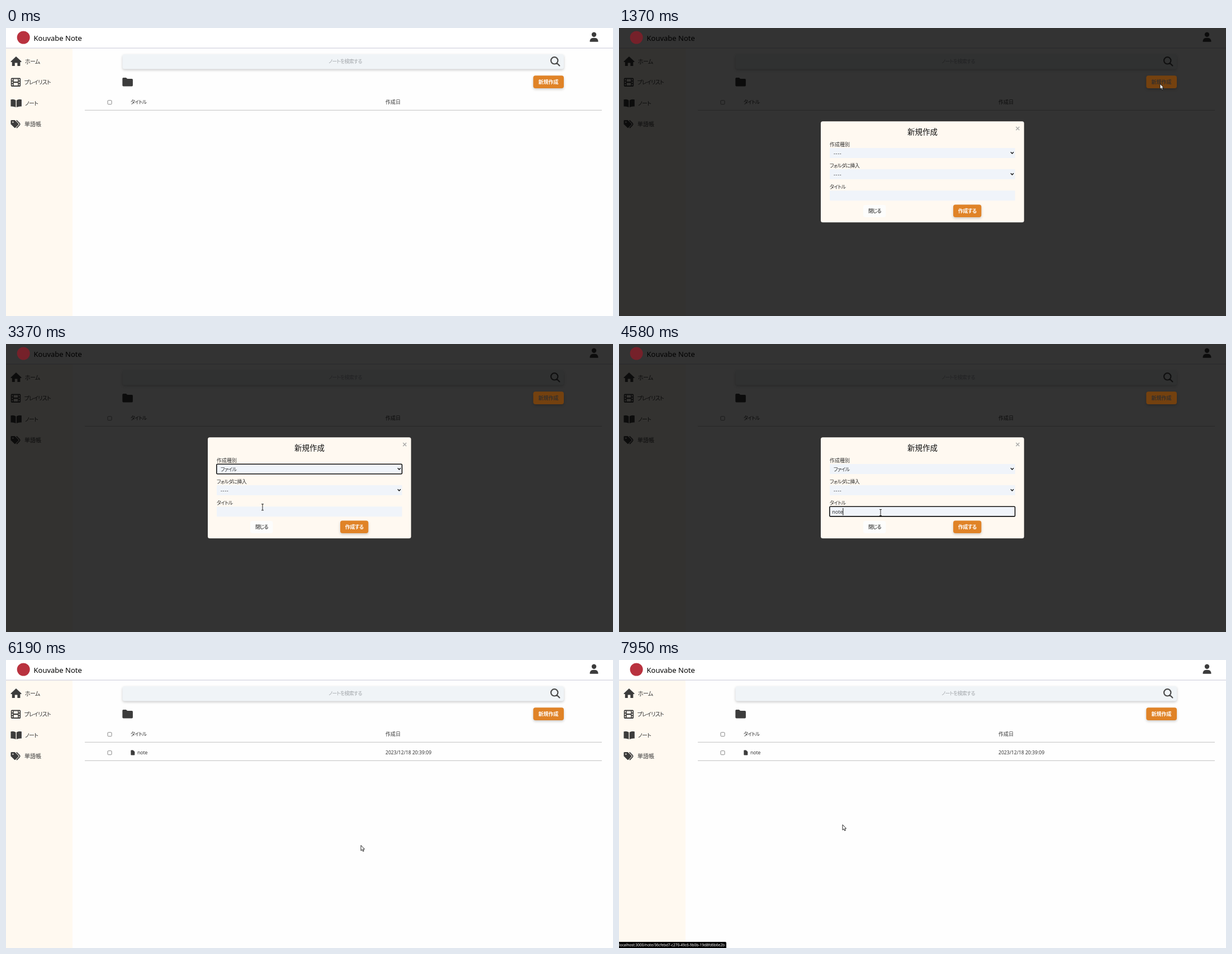
An HTML page for the animation above (8 s loop, 1086 by 516 pixels).

```html
<!DOCTYPE html>
<html lang="ja">
<head>
<meta charset="utf-8">
<title>Note</title>
<style>
  html, body { margin: 0; width: 100%; height: 100%; overflow: hidden; background: #fefefe; }
  svg { display: block; width: 100%; height: 100%; }
  text { font: 9px "Noto Sans", "Noto Sans CJK JP", "Noto Sans CJK", sans-serif; fill: #333; }
  .ja { font-family: "Noto Sans CJK JP", "Noto Sans CJK", sans-serif; }
  .kana { font-feature-settings: "palt"; letter-spacing: -.7px; }
  .menu { font-size: 10px; }
  .mid { text-anchor: middle; }
  .bold { font-weight: 700; fill: #fff; }
  .dash { letter-spacing: .7px; }
  .icon { fill: #3c3c3c; }
  .field { fill: #f0f4fa; }
  .line { stroke: #ccc; stroke-width: 1.2; }
  .box { fill: #fff; stroke: #767676; stroke-width: .9; }
  .ring { fill: none; stroke: #101010; stroke-width: 1.6; }
  .chevron { fill: none; stroke: #111; stroke-width: 1.4; }
  .pointer { fill: #fff; stroke: #111; stroke-width: .9; stroke-linejoin: round; }
  .soft { filter: drop-shadow(0 2px 2px #0003); }
</style>
</head>
<body>
<svg viewBox="0 0 1086 516">
  <rect width="1086" height="516" fill="#fefefe"/>
  <rect y="36" width="119" height="480" fill="#fff9f0"/>
  <rect width="1086" height="36" fill="#fff"/>
  <path d="M0 36H1086" stroke="#d9d9e3" stroke-width="1.4"/>

  <g class="icon">
    <circle cx="1052" cy="11.7" r="4.2"/>
    <path d="M1044.5 24.7q0-7 6-7h3q6 0 6 7z"/>
    <path d="M8.5 60 18 51l9.7 9q.2 1-.8 1h-1.5v7h-5v-5.5h-4.6V68h-5v-7H9.2q-1 0-.7-1z"/>
    <path fill-rule="evenodd" d="M10.5 89.5h14q1.7 0 1.7 1.7v12q0 1.7-1.7 1.7h-14q-1.7 0-1.7-1.7v-12q0-1.7 1.7-1.7zM13.8 91.5v4.4h7.4v-4.4zM13.8 98.3v4.6h7.4v-4.6zM10.4 91.6v2.4h1.9v-2.4zM10.4 96v2.4h1.9V96zM10.4 100.4v2.4h1.9v-2.4zM22.7 91.6v2.4h1.9v-2.4zM22.7 96v2.4h1.9V96zM22.7 100.4v2.4h1.9v-2.4z"/>
    <path d="M17.5 129.5V142q-3.5-2-9-1.5v-12.2q5.5-1.3 9 1.2zM18.9 129.5V142q3.5-2 9-1.5v-12.2q-5.5-1.3-9 1.2z"/>
    <path fill-rule="evenodd" d="M8.5 166.4q0-1.4 1.4-1.4h5.8l6.4 6.2q1 1 0 2l-5.2 5.4q-1 1-2 0l-6.4-6.3zM11.2 168.6a1.2 1.2 0 1 0 2.4 0 1.2 1.2 0 1 0-2.4 0z"/>
    <path d="M18.7 165.3l5.5 5.6q1.2 1.3 0 2.7l-5.2 5.6" fill="none" stroke="#3c3c3c" stroke-width="1.7"/>
    <path d="M208.3 90.6q0-1.7 1.7-1.7h4.8l2.4 2.2h8q1.7 0 1.7 1.7v10q0 1.7-1.7 1.7H210q-1.7 0-1.7-1.7z"/>
  </g>
  <text class="ja kana menu" x="34" y="63.7">ホーム</text>
  <text class="ja kana menu" x="32.5" y="101">プレイリスト</text>
  <text class="ja kana menu" x="34" y="138.5">ノート</text>
  <text class="ja menu" x="33" y="176">単語帳</text>

  <rect class="soft" x="208.5" y="47" width="789.5" height="26.5" rx="4" fill="#f0f4f7"/>
  <text class="ja kana mid" x="607" y="63.3" style="fill:#a3a7ab">ノートを検索する</text>
  <path d="M975 58.3a6.2 6.2 0 1 0 12.4 0 6.2 6.2 0 1 0-12.4 0M985.7 63l4.6 4.5" fill="none" stroke="#4a4a4a" stroke-width="2.2" stroke-linecap="round"/>

  <rect class="box" x="182" y="129.7" width="7" height="7" rx="1.3"/>
  <text class="ja kana" x="223" y="136.3">タイトル</text>
  <text class="ja" x="679" y="136.3">作成日</text>
  <path class="line" d="M141 147.3H1066"/>

  <g id="row">
    <rect class="box" x="182" y="162.7" width="7" height="7" rx="1.3"/>
    <path class="icon" d="M223.3 162.5q0-1 1-1h3l3 3v5q0 1-1 1h-5q-1 0-1-1z"/>
    <g id="rowText">
      <text x="235" y="169.2" style="font-size:8.6px">note</text>
      <text x="679" y="169.2" style="font-size:8.6px">2023/12/18 20:39:09</text>
    </g>
    <path class="line" d="M141 180.3H1066"/>
  </g>

  <rect id="shade" width="1086" height="516" fill="#000" opacity=".8"/>
  <circle id="logo" cx="31.2" cy="17" r="11.5"/>
  <text x="49.5" y="22.6" style="font-size:13px;font-weight:500;fill:#000">Kouvabe Note</text>
  <rect id="newButton" class="soft" x="943.3" y="85.3" width="54.7" height="22.7" rx="4"/>
  <text id="newLabel" class="ja bold mid" x="970.5" y="100">新規作成</text>

  <g id="modal">
    <rect x="361" y="167.3" width="363.7" height="181" rx="3.5" fill="#fff9f1"/>
    <text class="ja mid" x="543" y="191.3" style="font-size:13.5px;font-weight:500;fill:#111">新規作成</text>
    <path d="M710.3 177l6 6m0-6l-6 6" stroke="#aaa" stroke-width="1.5"/>
    <text class="ja" x="377" y="212">作成種別</text>
    <text class="ja kana" x="377" y="250">フォルダに挿入</text>
    <text class="ja kana" x="377" y="288">タイトル</text>
    <rect class="field" x="377" y="215" width="331.5" height="18"/>
    <rect class="field" x="377" y="253" width="331.5" height="18"/>
    <rect class="field" x="377" y="291.3" width="331.5" height="18"/>
    <path class="chevron" d="M700.8 222.3l2.6 2.6 2.6-2.6M700.8 260.3l2.6 2.6 2.6-2.6"/>
    <text id="kindNone" class="dash" x="384" y="227.5">----</text>
    <text id="kindFile" class="ja kana" x="384" y="227.5">ファイル</text>
    <text class="dash" x="384" y="265.5">----</text>
    <text id="typed" x="381.3" y="304"></text>
    <rect id="caret" y="294" width="1" height="13" fill="#111"/>
    <rect id="kindRing" class="ring" x="376.8" y="215.2" width="331.7" height="17.6" rx="1.5"/>
    <rect id="titleRing" class="ring" x="376.8" y="291.3" width="331.7" height="17.6" rx="1.5"/>
    <rect x="437" y="317" width="40.5" height="22" rx="4" fill="#fdfdfc"/>
    <text class="ja kana mid" x="457.3" y="331.2" style="font-weight:500;fill:#111">閉じる</text>
    <rect id="makeButton" class="soft" x="598" y="316.4" width="50.3" height="22.6" rx="4"/>
    <text class="ja kana bold mid" x="623.3" y="331.2" style="letter-spacing:-.3px">作成する</text>

    <g id="options">
      <rect x="377.2" y="233.7" width="330.8" height="37.5" rx="2" fill="#f3f5fa" stroke="#777" stroke-width=".8" style="filter:drop-shadow(0 6px 7px #0004)"/>
      <rect id="highlight" x="377.5" width="330.3" height="12.5" fill="#1967d2"/>
      <text class="dash" x="384" y="243.2">----</text>
      <text class="ja kana" x="384" y="255.6">フォルダ</text>
      <text class="ja kana" x="384" y="268.2">ファイル</text>
    </g>
  </g>

  <g id="status">
    <path d="M0 505H190q2 0 2 2V516H0z" fill="#000"/>
    <text x="0" y="513" style="font-size:6.55px;fill:#fff">localhost:3000/note/36cfebd7-c270-49c6-9b0b-19d8fd6b6e2b</text>
  </g>

  <g id="cursor">
    <circle id="press" cy=".5" r="7" fill="#fff000" opacity=".62"/>
    <path id="arrow" class="pointer" d="M0 0V9.6L2.2 7.6 3.7 10.9 5.3 10.2 3.9 7H6.6z"/>
    <path id="hand" class="pointer" d="M-1.2 1.2q1.2-2 2.4 0V5.2l3.6.8q1.4.4 1.3 2l-.5 3-.9 2.4H-.4L-3.5 9.1q-.7-1.8.8-1.7l1.5 1z"/>
    <path id="beam" d="M-2-5.5H2M0-5.5V5.5M-2 5.5H2" stroke="#222" fill="none"/>
  </g>
</svg>
<script>
const LOOP = 8000;
const el = {};
document.querySelectorAll('[id]').forEach(node => el[node.id] = node);

// Pointer waypoints: time, x, y
const path = [
  [70, 1060, 476], [350, 898, 330], [810, 962, 123], [900, 967, 104], [1000, 968, 100],
  [1400, 968, 100], [1640, 590, 190], [1710, 560, 185], [2000, 540, 216], [2260, 540, 216],
  [2460, 500, 240], [2810, 465, 262], [3090, 465, 262], [3370, 459, 292], [3460, 458, 324],
  [3580, 465, 300], [3710, 468, 302], [5160, 468, 302], [5680, 635, 332], [6400, 635, 332],
  [7150, 232, 168], [7400, 232, 168], [7950, 400, 295]
];
const clicks = [[1230, 1370], [2120, 2260], [3020, 3090], [3540, 3640], [5710, 5790], [7280, 7400]];
const keyTimes = [4310, 4400, 4490, 4580];

const within = (t, from, to) => t >= from && t < to;
const show = (node, on) => node.style.display = on ? '' : 'none';

function pointerAt(t) {
  const i = path.findIndex(p => p[0] > t);
  if (i < 0) return path[path.length - 1].slice(1);
  if (i === 0) return path[0].slice(1);
  const [t0, x0, y0] = path[i - 1], [t1, x1, y1] = path[i];
  const k = (t - t0) / (t1 - t0);
  return [x0 + (x1 - x0) * k, y0 + (y1 - y0) * k];
}

function draw(t) {
  const [x, y] = pointerAt(t);
  const inside = (x0, y0, x1, y1) => x >= x0 && x < x1 && y >= y0 && y < y1;
  const open = within(t, 1370, 6190), listed = within(t, 2120, 3090);
  const overNew = !open && inside(943, 85, 998, 108);
  const overMake = open && inside(598, 316, 649, 339);
  const overClose = open && inside(437, 317, 478, 339);
  const overRow = t >= 6190 && inside(141, 148, 1066, 180);
  const overTitle = open && !listed && inside(377, 291, 709, 309);
  const hand = overNew || overMake || overClose || overRow;

  show(el.shade, open);
  show(el.modal, open);
  show(el.row, t >= 6190);
  show(el.status, t >= 7280);
  el.rowText.style.opacity = overRow ? .6 : 1;
  el.logo.style.fill = open ? '#75212a' : '#b9323f';
  el.newButton.style.fill = open ? '#74410f' : overNew ? '#b86a1f' : '#e08327';
  el.newLabel.style.fill = open ? '#38302a' : '#fff';
  el.makeButton.style.fill = overMake ? '#b86a1f' : '#e08327';

  show(el.options, listed);
  const option = Math.max(0, Math.min(2, Math.floor((y - 233.7) / 12.5)));
  el.highlight.setAttribute('y', 233.9 + option * 12.5);
  el.options.querySelectorAll('text').forEach((label, i) =>
    label.style.fill = i === option ? '#fff' : '#222');
  show(el.kindNone, t < 3090);
  show(el.kindFile, t >= 3090);
  show(el.kindRing, within(t, 3090, 3580));
  show(el.titleRing, within(t, 3580, 5710));

  el.typed.textContent = 'note'.slice(0, keyTimes.filter(k => t >= k).length);
  show(el.caret, within(t, 3580, 4110) || within(t, 4310, 5110) || within(t, 5640, 5710));
  if (open) el.caret.setAttribute('x', 381 + el.typed.getComputedTextLength());

  show(el.cursor, t >= 70);
  el.cursor.setAttribute('transform', `translate(${x} ${y})`);
  show(el.press, clicks.some(([from, to]) => within(t, from, to)));
  show(el.hand, hand);
  show(el.beam, overTitle);
  show(el.arrow, !hand && !overTitle);
}

const start = performance.now();
function tick() {
  draw((performance.now() - start) % LOOP);
  requestAnimationFrame(tick);
}
tick();
</script>
</body>
</html>
```
